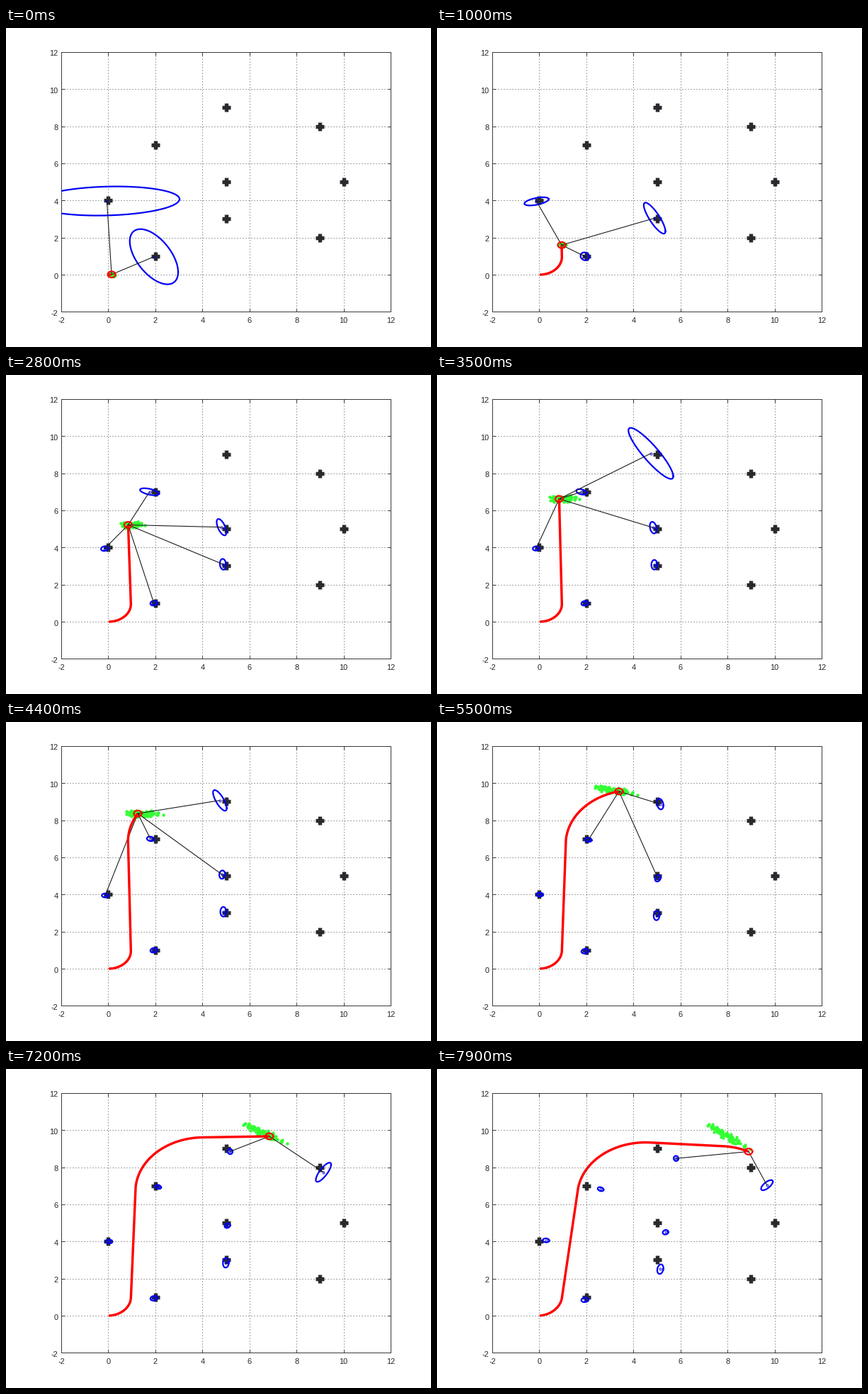
Recreate the animation shown at these times as a matplotlib script. Size 600 by 450 pixels, loop 8000 ms.

```python
import numpy as np
import matplotlib.pyplot as plt
from matplotlib.animation import FuncAnimation

W, H, FRAMES = 600, 450, 80
DARK, BLUE, RED, GREEN = "#2a2a2e", "#0000f5", "#ff0000", "#33ff33"

LANDMARKS = [(2, 1), (0, 4), (2, 7), (9, 2), (10, 5), (9, 8), (5, 5), (5, 3), (5, 9)]
SENSOR_RANGE = 5.0
NOISE = 0.774       # 95 % scale of the range and bearing noise
REPEAT_GAIN = 2.0   # weight of every later sighting
BIAS = np.array([-0.06, -0.03])

# Drive: left bend, straight, wide right turn, straight, right turn
SPEED, STEP = 0.201, 0.02
BEND_R, TURN_R = 0.97, 2.9
BEND_END = BEND_R * np.radians(88.8)
TURN_START = BEND_END + 5.85
TURN_END = TURN_START + TURN_R * np.radians(86.8)
LAST_TURN = TURN_END + 3.1

# The best map leans clockwise about the end of the first bend, in degrees
PIVOT = np.array([0.97, 0.95])
LEAN_TIMES = [0, 20, 35, 44, 55, 72, 79]
LEANS = [0, -2.2, -1.4, -1.4, 1.4, 1.7, 6.4]


def lean_at(f):
    return np.interp(f, LEAN_TIMES, LEANS)


def rotate(vec, deg):
    """Turn row vectors clockwise."""
    c, s = np.cos(np.radians(deg)), np.sin(np.radians(deg))
    x, y = np.asarray(vec)[..., 0], np.asarray(vec)[..., 1]
    return np.stack([c * x + s * y, c * y - s * x], axis=-1)


def lean(points, deg):
    return PIVOT + rotate(points - PIVOT, deg)


def drive():
    s = np.arange(0, SPEED * (FRAMES + 1), STEP)
    right = ((s >= TURN_START) & (s < TURN_END)) | (s >= LAST_TURN)
    bend = np.where(s < BEND_END, 1 / BEND_R, np.where(right, -1 / TURN_R, 0))
    heading = np.cumsum(bend) * STEP
    moves = STEP * np.column_stack([np.cos(heading), np.sin(heading)])
    return s, np.cumsum(moves, axis=0)


DIST, ROUTE = drive()


def travelled(f):
    """Number of route samples covered at frame f."""
    return int(SPEED * (f + 0.6) / STEP) + 1


def simulate():
    """Per frame: {landmark: (root of covariance, in view)}."""
    info, states = {}, []
    for f in range(FRAMES):
        pos = ROUTE[travelled(f) - 1]
        views = {}
        for mark in LANDMARKS:
            d = mark - pos
            r = np.hypot(*d)
            seen = r < SENSOR_RANGE
            if seen:
                c, s = d / r
                rot = np.array([[c, -s], [s, c]])
                gain = REPEAT_GAIN if mark in info else 1
                new = rot @ np.diag([1, 1 / r**2]) @ rot.T * gain / NOISE**2
                info[mark] = info.get(mark, 0) + new
            if mark in info:
                cov = np.linalg.inv(info[mark]) + 0.06**2 * np.eye(2)
                views[mark] = np.linalg.cholesky(cov), seen
        states.append(views)
    return states


STATES = simulate()
rng = np.random.default_rng(4)
SWAY = rng.normal(-0.3, 2.4, 100).clip(-6, 5.5)
SCATTER = rng.normal(size=(100, 2)).clip(-2, 2)
ANGLE = np.linspace(0, 2 * np.pi, 80)
CIRCLE = np.column_stack([np.cos(ANGLE), np.sin(ANGLE)])

plt.rcParams["font.family"] = "Liberation Sans"
fig = plt.figure(figsize=(W / 72, H / 72), dpi=72, facecolor="white")
ax = fig.add_axes([0.13, 0.1102, 0.775, 0.8148])
ticks = range(-2, 13, 2)
ax.set(xlim=(-2, 12), ylim=(-2, 12), xticks=ticks, yticks=ticks)
ax.set_axisbelow(True)
ax.grid(color="#4a4a4a", lw=1, ls=(0, (1, 3)))
ax.tick_params(direction="in", top=True, right=True, length=4.5, width=0.9,
               color=DARK, labelbottom=False, labelleft=False)
for spine in ax.spines.values():
    spine.set(color="#3a3a3a", linewidth=1)


def label(value, at, shift, ha):
    ax.annotate(str(value), at, xytext=shift, textcoords="offset points",
                ha=ha, va="center_baseline", fontsize=11, color="#262626")


for v in ticks:
    label(v, (v, -2), (0, -12), "center")
    label(v, (-2, v), (-4.5, -1.5), "right")


def line(z, **style):
    return ax.plot([], [], zorder=z, **style)[0]


particles = line(3, ls="", marker="o", ms=4.4, mew=0, color=GREEN)
ax.plot(*zip(*LANDMARKS), ls="", marker="+", ms=11.5, mew=5.4, color=DARK, zorder=4)
ellipses = {mark: line(6, color=BLUE, lw=2.2) for mark in LANDMARKS}
means = line(6, ls="", marker="o", ms=3, mew=0.9, mfc="none", color=BLUE)
rays = line(7, color="#1a1a1a", lw=1.1)
trail = line(8, color=RED, lw=3.4, solid_capstyle="butt")
robot = line(8, color=RED, lw=2.2)


def update(f):
    tilt = lean_at(f)
    n = travelled(f)
    # The lean grows along the first bend, so the start stays put
    path = lean(ROUTE[:n], tilt * np.minimum(DIST[:n] / BEND_END, 1))
    pos = path[-1]
    trail.set_data(*path.T)
    robot.set_data(*(pos + 0.165 * CIRCLE).T)

    spread = min(0.03 + 0.002 * f, 0.09)
    cloud = lean(np.tile(ROUTE[n - 1], (100, 1)), SWAY) + spread * SCATTER
    particles.set_data(*cloud.T)

    centres, fan = [], []
    for mark, curve in ellipses.items():
        if mark not in STATES[f]:
            curve.set_data([], [])
            continue
        root, seen = STATES[f][mark]
        mean = lean(np.array(mark), tilt) + BIAS
        curve.set_data(*(mean + rotate(CIRCLE @ root.T, tilt)).T)
        centres.append(mean)
        if seen:
            fan += [pos, mean, (np.nan, np.nan)]
    means.set_data(*np.array(centres).T)
    rays.set_data(*np.array(fan).T)
    return particles, means, rays, trail, robot, *ellipses.values()


anim = FuncAnimation(fig, update, frames=FRAMES, interval=100,
                     repeat=True, repeat_delay=0, blit=False)
plt.show()
```
